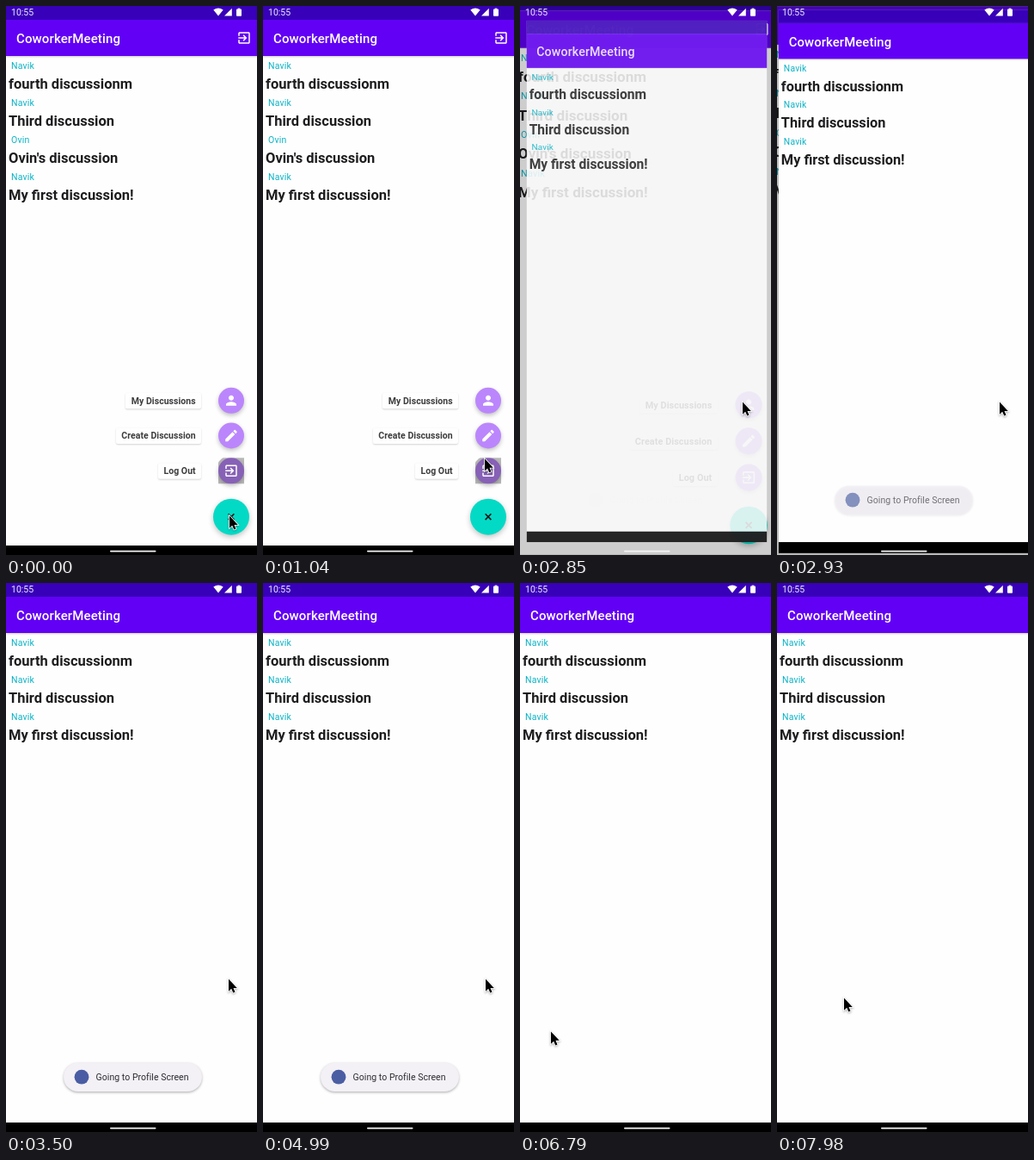
An HTML page with a canvas for the animation above (8000 ms loop, 292x637 px).

```html
<!DOCTYPE html>
<html lang="en">
<head>
<meta charset="utf-8">
<title>Discussions</title>
<style>
html, body { margin: 0; width: 100%; height: 100%; overflow: hidden; background: #fefefe; }
canvas { display: block; width: 292px; height: 637px; }
</style>
</head>
<body>
<canvas id="stage"></canvas>
<script>
const W = 292, H = 637, LOOP = 8000;
const CX = 147.5, CY = 319.5; // centre of the phone screen, slightly wider than the stage
const canvas = document.getElementById('stage');
const ctx = canvas.getContext('2d');
const dpr = window.devicePixelRatio || 1;
canvas.width = Math.round(W * dpr);
canvas.height = Math.round(H * dpr);

const ICON = {
  person: new Path2D('M12 12c2.21 0 4-1.79 4-4s-1.79-4-4-4-4 1.79-4 4 1.79 4 4 4zm0 2c-2.67 0-8 1.34-8 4v2h16v-2c0-2.66-5.33-4-8-4z'),
  edit: new Path2D('M3 17.25V21h3.75L17.81 9.94l-3.75-3.75L3 17.25zM20.71 7.04c.39-.39.39-1.02 0-1.41l-2.34-2.34c-.39-.39-1.02-.39-1.41 0l-1.83 1.83 3.75 3.75 1.83-1.83z'),
  exit: new Path2D('M10.09 15.59L11.5 17l5-5-5-5-1.41 1.41L12.67 11H3v2h9.67l-2.58 2.59zM19 3H5c-1.11 0-2 .9-2 2v4h2V5h14v14H5v-4H3v4c0 1.1.89 2 2 2h14c1.1 0 2-.9 2-2V5c0-1.1-.9-2-2-2z')
};
const ARROW = new Path2D('M0 0V14.2L3.2 11.2L5.3 16L7.5 15L5.5 10.4H9.8Z');

const FOURTH = ['Navik', 'fourth discussionm'];
const THIRD = ['Navik', 'Third discussion'];
const OTHER = ['Ovin', "Ovin's discussion"];
const FIRST = ['Navik', 'My first discussion!'];

// time, x, y of the pointer tip
const POINTER = [
  [0, 260, 591], [300, 260, 591], [440, 256, 572], [590, 256, 572], [750, 255, 573],
  [910, 255, 573], [1040, 258, 525], [1160, 254, 494], [1290, 257, 477], [1420, 254, 483],
  [1560, 259, 499], [2080, 259, 499], [2290, 259, 459], [6000, 259, 459],
  [6070, 256, 476], [6200, 241, 530], [6290, 223, 569], [6340, 207, 578], [6400, 180, 585],
  [6480, 140, 590], [6560, 100, 590], [6640, 80, 565], [6720, 55, 538], [6790, 36, 520],
  [7210, 23, 508], [7340, 23, 508], [7470, 113, 506], [7870, 113, 506], [7980, 78, 481]
];

const clamp = v => Math.min(1, Math.max(0, v));
const ramp = (t, from, to) => clamp((t - from) / (to - from));
const bez = (u, a, b, c, d) =>
  (1 - u) ** 3 * a + 3 * (1 - u) ** 2 * u * b + 3 * (1 - u) * u * u * c + u ** 3 * d;

function solve(x, xs, ys) {
  let lo = 0, hi = 1;
  for (let i = 0; i < 24; i++) {
    const mid = (lo + hi) / 2;
    if (bez(mid, ...xs) < x) lo = mid; else hi = mid;
  }
  return bez(lo, ...ys);
}

// fast out, extra slow in
function openEase(x) {
  if (x <= 0) return 0;
  if (x >= 1) return 1;
  return x < 1 / 6
    ? solve(x, [0, 0.05, 0.1333, 1 / 6], [0, 0, 0.06, 0.4])
    : solve(x, [1 / 6, 0.2083, 0.25, 1], [0.4, 0.82, 1, 1]);
}

function rect(x, y, w, h, fill) {
  ctx.fillStyle = fill;
  ctx.fillRect(x, y, w, h);
}

function disc(x, y, r, fill) {
  ctx.fillStyle = fill;
  ctx.beginPath();
  ctx.arc(x, y, r, 0, Math.PI * 2);
  ctx.fill();
}

function pill(x, y, w, h, r, fill) {
  ctx.fillStyle = fill;
  ctx.beginPath();
  ctx.roundRect(x, y, w, h, r);
  ctx.fill();
}

function text(str, x, y, size, weight, fill, align = 'left', spacing = 0) {
  ctx.font = `${weight} ${size}px Roboto, sans-serif`;
  ctx.letterSpacing = spacing + 'px';
  ctx.textAlign = align;
  ctx.fillStyle = fill;
  ctx.fillText(str, x, y);
}

function icon(path, x, y) {
  ctx.save();
  ctx.translate(x - 9, y - 9);
  ctx.scale(0.75, 0.75);
  ctx.fillStyle = '#fff';
  ctx.fill(path);
  ctx.restore();
}

function withShadow(blur, dy, alpha, draw) {
  ctx.save();
  ctx.shadowColor = `rgba(0,0,0,${alpha})`;
  ctx.shadowBlur = blur * dpr;
  ctx.shadowOffsetY = dy * dpr;
  draw();
  ctx.restore();
}

function page(items) {
  rect(0, 0, 295, 639, '#fefefe');
  withShadow(2, 0.5, 0.2, () => rect(0, 16, 295, 42, '#6200f5'));
  rect(0, 0, 295, 16, '#3800b8');
  text('CoworkerMeeting', 12, 43, 15, 500, '#fff', 'left', 0.12);
  items.forEach(([name, title], i) => {
    text(name, 6, 72.7 + i * 43, 10.5, 400, '#0bb3c6', 'left', 0.18);
    text(title, 3, 96 + i * 43, 16.5, 700, '#1d1d1f');
  });
  rect(0, 626, 295, 13, '#000');
}

// touch feedback spreading from the lower right of the button
function ripple(x, y, alpha) {
  ctx.save();
  ctx.beginPath();
  ctx.rect(x - 15, y - 15, 30, 30);
  ctx.clip();
  disc(x + 4, y + 4, 23.5, `rgba(0,0,0,${alpha})`);
  ctx.restore();
}

function menuItem(label, left, y, glyph, press = 0) {
  withShadow(2, 1, 0.17, () => pill(left, y - 9, 227 - left, 18.5, 2, '#fefefe'));
  text(label, 220.7, y + 3.8, 10.5, 700, '#3c3c3e', 'right', 0.05);
  withShadow(5, 2.5, 0.24, () => disc(262, y, 15, '#bb86fc'));
  if (press > 0) ripple(262, y, press);
  icon(glyph, 262, y);
}

function homePage(t) {
  page([FOURTH, THIRD, OTHER, FIRST]);
  icon(ICON.exit, 277, 37);
  const press = t < 2620 ? 0.28 : 0.2 * (1 - ramp(t, 2680, 2760));
  menuItem('My Discussions', 139, 457.8, ICON.person);
  menuItem('Create Discussion', 128, 498.5, ICON.edit);
  menuItem('Log Out', 177, 539.3, ICON.exit, press);
  withShadow(6, 2.5, 0.24, () => disc(262, 592.7, 21, '#03dac5'));
  ctx.strokeStyle = '#151515';
  ctx.lineWidth = 1.6;
  ctx.beginPath();
  ctx.moveTo(258.6, 589.3);
  ctx.lineTo(265.4, 596.1);
  ctx.moveTo(265.4, 589.3);
  ctx.lineTo(258.6, 596.1);
  ctx.stroke();
}

function zoomed(scale, alpha, draw) {
  ctx.save();
  ctx.globalAlpha = alpha;
  ctx.translate(CX, CY);
  ctx.scale(scale, scale);
  ctx.translate(-CX, -CY);
  draw();
  ctx.restore();
}

function systemBars() {
  text('10:55', 6, 11.2, 10.5, 400, '#f1ecfb');
  ctx.fillStyle = '#fff';
  ctx.beginPath();
  ctx.moveTo(247, 11.6);
  ctx.lineTo(241.3, 4.6);
  ctx.quadraticCurveTo(247, 0.6, 252.7, 4.6);
  ctx.closePath();
  ctx.moveTo(262.8, 2.8);
  ctx.lineTo(262.8, 11.6);
  ctx.lineTo(254, 11.6);
  ctx.closePath();
  ctx.fill();
  pill(268, 3.6, 6, 8.2, 0.8, '#fff');
  rect(269.7, 2.6, 2.6, 1.2, '#fff');
  pill(121, 631.7, 53.5, 1.8, 0.9, '#f4f4f4');
}

function toast(alpha) {
  if (alpha <= 0) return;
  ctx.save();
  ctx.globalAlpha = alpha;
  withShadow(3, 1.2, 0.3 * alpha ** 2, () => pill(67, 556.5, 161, 33.5, 16.7, '#f3f0f6'));
  disc(88, 573.2, 8.4, '#4a5ca3');
  text('Going to Profile Screen', 104.6, 577.3, 10.5, 400, '#2c2b30', 'left', 0.04);
  ctx.restore();
}

function pointer(t) {
  let i = 0;
  while (i < POINTER.length - 2 && t >= POINTER[i + 1][0]) i++;
  const [t0, x0, y0] = POINTER[i], [t1, x1, y1] = POINTER[i + 1];
  const k = ramp(t, t0, t1);
  ctx.save();
  ctx.translate(x0 + (x1 - x0) * k, y0 + (y1 - y0) * k + 0.5);
  ctx.lineJoin = 'miter';
  ctx.strokeStyle = '#fff';
  ctx.lineWidth = 1.6;
  withShadow(2.5, 1, 0.35, () => ctx.stroke(ARROW));
  ctx.fillStyle = '#000';
  ctx.fill(ARROW);
  ctx.restore();
}

function draw(t) {
  ctx.setTransform(dpr, 0, 0, dpr, 0, 0);
  const p = openEase(ramp(t, 2770, 3170));
  if (p < 1) {
    zoomed(1 + 0.055 * p, 1, () => homePage(t));
    if (p > 0) rect(0, 0, W, H, `rgba(0,0,0,${0.3 * p})`);
  }
  const alpha = ramp(t, 2800, 2860);
  if (alpha > 0) zoomed(0.85 + 0.15 * p, alpha, () => page([FOURTH, THIRD, FIRST]));
  systemBars();
  toast(ramp(t, 2850, 2975) * (1 - ramp(t, 4990, 5170)));
  pointer(t);
}

const start = performance.now();
function tick() {
  draw((performance.now() - start) % LOOP);
  requestAnimationFrame(tick);
}
tick();
</script>
</body>
</html>
```
